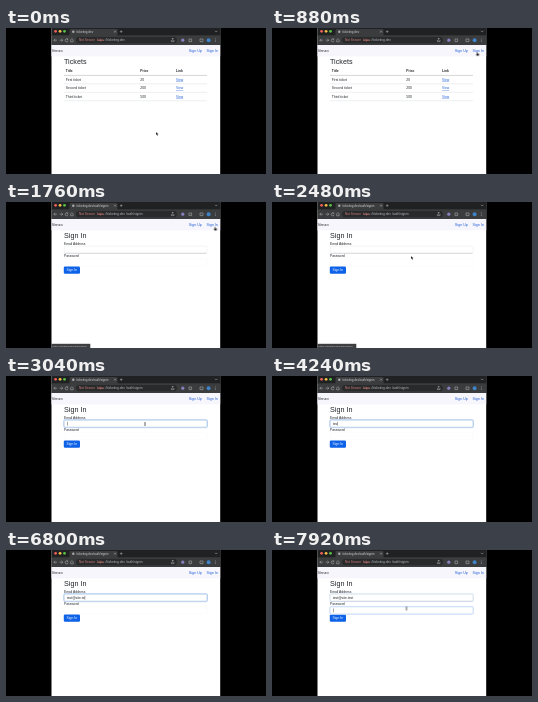
Write an HTML page that moves like this. It is 260x146 px and loops after 8000 ms.

```html
<!DOCTYPE html>
<html lang="en">
<head>
<meta charset="utf-8">
<title>Tickets</title>
<style>
  html, body { margin: 0; width: 100%; height: 100%; overflow: hidden; background: #000; }
  svg { display: block; width: 100vw; height: 100vh; }
  text { font-family: "Liberation Sans", Arial, sans-serif; font-size: 3.35px; fill: #212529; white-space: pre; }
  .h { font-size: 7.2px; }
  .b { font-weight: 700; }
  .link { fill: #2460d8; }
  .u { text-decoration: underline; }
  .tab { font-size: 3px; fill: #d2d3d5; }
  .url { font-size: 3.2px; fill: #b9bbbe; }
  .bad { fill: #d9827b; }
  .status { font-size: 2.5px; fill: #c4c4c4; }
  .icon { fill: none; stroke: #b8babd; stroke-width: .5; }
  .rule { stroke: #dcdfe2; stroke-width: .5; }
  .a { animation: 8s step-end infinite; }
  .list { animation-name: list; }
  .form { animation-name: form; }
  .tip { animation-name: tip; }
  .email { animation-name: email; }
  .email, .pass { animation-timing-function: linear; }
  .pass { animation-name: pass; }
  .arrow { animation-name: arrow; }
  .hand { animation-name: hand; }
  .beam { animation-name: beam; }
  #pointer { animation: move 8s ease-in-out infinite; }
  @keyframes list { 0% { visibility: visible } 21% { visibility: hidden } 100% { visibility: hidden } }
  @keyframes form { 0% { visibility: hidden } 21% { visibility: visible } 100% { visibility: visible } }
  @keyframes tip { 0% { visibility: hidden } 18% { visibility: visible } 34% { visibility: hidden } 100% { visibility: hidden } }
  @keyframes email { 0%, 35.9% { opacity: 0 } 37.8%, 97.9% { opacity: 1 } 99.8%, 100% { opacity: 0 } }
  @keyframes pass { 0%, 97.9% { opacity: 0 } 99.4%, 100% { opacity: 1 } }
  @keyframes arrow { 0% { visibility: visible } 8% { visibility: hidden } 25.5% { visibility: visible } 32% { visibility: hidden } 100% { visibility: hidden } }
  @keyframes hand { 0% { visibility: hidden } 8% { visibility: visible } 25.5% { visibility: hidden } 100% { visibility: hidden } }
  @keyframes beam { 0% { visibility: hidden } 32% { visibility: visible } 46% { visibility: hidden } 92% { visibility: visible } 100% { visibility: visible } }
  @keyframes move {
    0%, .5% { transform: translate(150px, 104px) }
    7% { transform: translate(203px, 25px) }
    9% { transform: translate(204px, 24px) }
    17%, 24.5% { transform: translate(208.4px, 24.8px) }
    31% { transform: translate(139px, 54px) }
    35%, 92% { transform: translate(139px, 48px) }
    95%, 100% { transform: translate(134.5px, 58.5px) }
  }
</style>
</head>
<body>
<svg viewBox="0 0 260 146" preserveAspectRatio="none">
  <rect width="260" height="146" fill="#000"/>
  <rect x="45.5" width="168.7" height="146" fill="#fff"/>

  <!-- browser bars -->
  <rect x="45.5" width="168.7" height="8" fill="#202122"/>
  <path d="M62 8q1.5 0 1.5-1.5V2.4q0-1.4 1.4-1.4h45.2q1.4 0 1.4 1.4v4.1q0 1.5 1.5 1.5z" fill="#3b3c3d"/>
  <rect x="45.5" y="7.3" width="168.7" height="9.7" fill="#3b3c3d"/>
  <circle cx="49.6" cy="3.3" r="1.4" fill="#f2605a"/>
  <circle cx="54.1" cy="3.3" r="1.4" fill="#f5bd45"/>
  <circle cx="58.5" cy="3.3" r="1.4" fill="#58c245"/>
  <circle cx="67.3" cy="3.8" r="1.2" fill="#a9abae"/>
  <g class="icon">
    <path d="M108.2 2.7l1.8 1.8m0-1.8l-1.8 1.8M113.9 3.6h2.6m-1.3-1.3v2.6M209 2.8l1.2 1.2 1.2-1.2"/>
    <path d="M51 12.2h-3.2m1.4-1.4l-1.4 1.4 1.4 1.4M53.6 12.2h3.2m-1.4-1.4l1.4 1.4-1.4 1.4" />
    <path d="M61.6 11.2a1.5 1.5 0 1 0 .5 1.4m-.3-2.2v1.1h-1.2M64.2 12.2l1.7-1.5 1.7 1.5m-2.9 0v1.6h2.4v-1.6"/>
  </g>
  <rect x="70" y="9.1" width="101" height="6.2" rx="3.1" fill="#282a2c"/>
  <g class="icon">
    <path d="M165.4 12v1.6h2.6V12m-1.3 .7v-2.6m-.9 .9l.9-.9.9 .9"/>
    <path d="M183 11h2.6v2.6H183zM194 11h3v2.6h-3z"/>
    <path d="M209.4 10.6v.6m0 .7v.6m0 .7v.6" stroke-width=".7"/>
  </g>
  <circle cx="176.8" cy="12.2" r="1.6" fill="#8b7fc2"/>
  <circle cx="202.6" cy="12.2" r="2" fill="#3e83c8"/>
  <text class="url bad" x="73" y="13.4">Not Secure</text>
  <text class="url bad" x="91" y="13.4" text-decoration="line-through">https</text>
  <text class="url" x="98.5" y="13.4">://ticketing.dev</text>
  <text class="tab a list" x="70.5" y="4.9">ticketing.dev</text>
  <g class="a form">
    <text class="tab" x="70.5" y="4.9">ticketing.dev/auth/signin</text>
    <text class="url" x="120.2" y="13.4">/auth/signin</text>
  </g>

  <!-- navigation -->
  <rect x="45.5" y="17" width="168.7" height="11.4" fill="#f7f6fd"/>
  <text x="45.7" y="24.2" font-size="4.2" style="font-size:4px">Venzo</text>
  <text class="link" x="182.8" y="24" style="font-size:3.7px">Sign Up</text>
  <text class="link" x="200.4" y="24" style="font-size:3.7px">Sign In</text>

  <g class="a list">
    <text class="h" x="58" y="35.6">Tickets</text>
    <g id="rows"></g>
  </g>

  <g class="a form">
    <text class="h" x="58" y="35.6">Sign In</text>
    <text x="58" y="42.6">Email Address</text>
    <rect x="58.2" y="44.2" width="142.8" height="7" rx="1" fill="#fff" stroke="#e3e6e9" stroke-width=".4"/>
    <path d="M58.6 51.3h142" stroke="#b3b7bb" stroke-width=".5"/>
    <text x="58" y="55.2">Password</text>
    <rect x="58.2" y="56.9" width="142.8" height="7" rx="1" fill="#fff" stroke="#f0f2f4" stroke-width=".3"/>
    <rect x="57.8" y="64.6" width="16.2" height="7.2" rx="1.2" fill="#0d62e8"/>
    <text x="60.6" y="69.4" style="fill:#fff">Sign In</text>
    <g fill="#fff" stroke-width=".5">
      <g class="a email">
        <rect x="57.7" y="43.7" width="143.8" height="8" rx="1.3" stroke="#c2dafc" stroke-width="1"/>
        <rect x="58.2" y="44.2" width="142.8" height="7" rx="1" stroke="#91b0cf"/>
      </g>
      <g class="a pass">
        <rect x="57.7" y="56.4" width="143.8" height="8" rx="1.3" stroke="#cfe2ff" stroke-width="1"/>
        <rect x="58.2" y="56.9" width="142.8" height="7" rx="1" stroke="#9fbfe8"/>
      </g>
    </g>
    <text id="typed" x="60.8" y="48.9"></text>
    <rect id="caret" width=".4" height="3.8" fill="#222"/>
  </g>

  <g class="a tip">
    <rect x="45.5" y="141.8" width="38.8" height="4.2" fill="#3d3e40"/>
    <text class="status" x="46.6" y="144.8">https://ticketing.dev/auth/signin</text>
  </g>

  <g id="pointer">
    <path class="a arrow" d="M0 0v3.2l.8-.7.6 1.3.7-.3-.6-1.2h1z" fill="#000" stroke="#fff" stroke-width=".25"/>
    <path class="a hand" d="M0 0q.5-.4.8 0v1.3l1.3 .3q.5.2.4.8l-.4 1.3H.2L-.8 2.3q.1-.5.8 0z" fill="#111" stroke="#fff" stroke-width=".3"/>
    <path class="a beam" d="M-.7-1.6q.7 0 .7.5v2.2q0 .5-.7.5M.7-1.6q-.7 0-.7.5v2.2q0 .5.7.5" fill="none" stroke="#333" stroke-width=".45"/>
  </g>
</svg>
<script>
  const $ = id => document.getElementById(id);

  const rows = [
    ["Title", "Price", "Link"],
    ["First ticket", "20", "View"],
    ["Second ticket", "200", "View"],
    ["Third ticket", "500", "View"]
  ];
  const columns = [59.8, 134.3, 170];
  $("rows").innerHTML = rows.map((row, r) => {
    const y = 44.2 + r * 8.45;
    const cells = row.map((word, c) => {
      const kind = r === 0 ? "b" : c === 2 ? "link u" : "";
      return `<text class="${kind}" x="${columns[c]}" y="${y}">${word}</text>`;
    }).join("");
    const line = `<path class="rule" d="M58 ${y + 3.2}h143"${r ? "" : ' style="stroke:#aaa"'}/>`;
    return cells + line;
  }).join("");

  const entry = "test@site.test";
  const keys = [3680, 3840, 4080, 4320, 4720, 5200, 5280, 5360, 5440, 6000, 6160, 6400, 6800, 6960];
  const typed = $("typed"), caret = $("caret");
  const clock = $("pointer").getAnimations()[0];

  function draw() {
    const t = (clock.currentTime || 0) % 8000;
    const count = keys.filter(k => k <= t).length;
    const text = entry.slice(0, count);
    if (typed.textContent !== text) typed.textContent = text;

    const inPass = t >= 7840;
    const since = t - Math.max(2880, inPass ? 7840 : keys[count - 1] || 0);
    const shown = t >= 2880 && since % 1000 < 500;
    caret.setAttribute("x", 61 + (inPass || !count ? 0 : typed.getComputedTextLength()));
    caret.setAttribute("y", inPass ? 58.5 : 45.8);
    caret.setAttribute("opacity", shown ? 1 : 0);
    requestAnimationFrame(draw);
  }
  draw();
</script>
</body>
</html>
```
